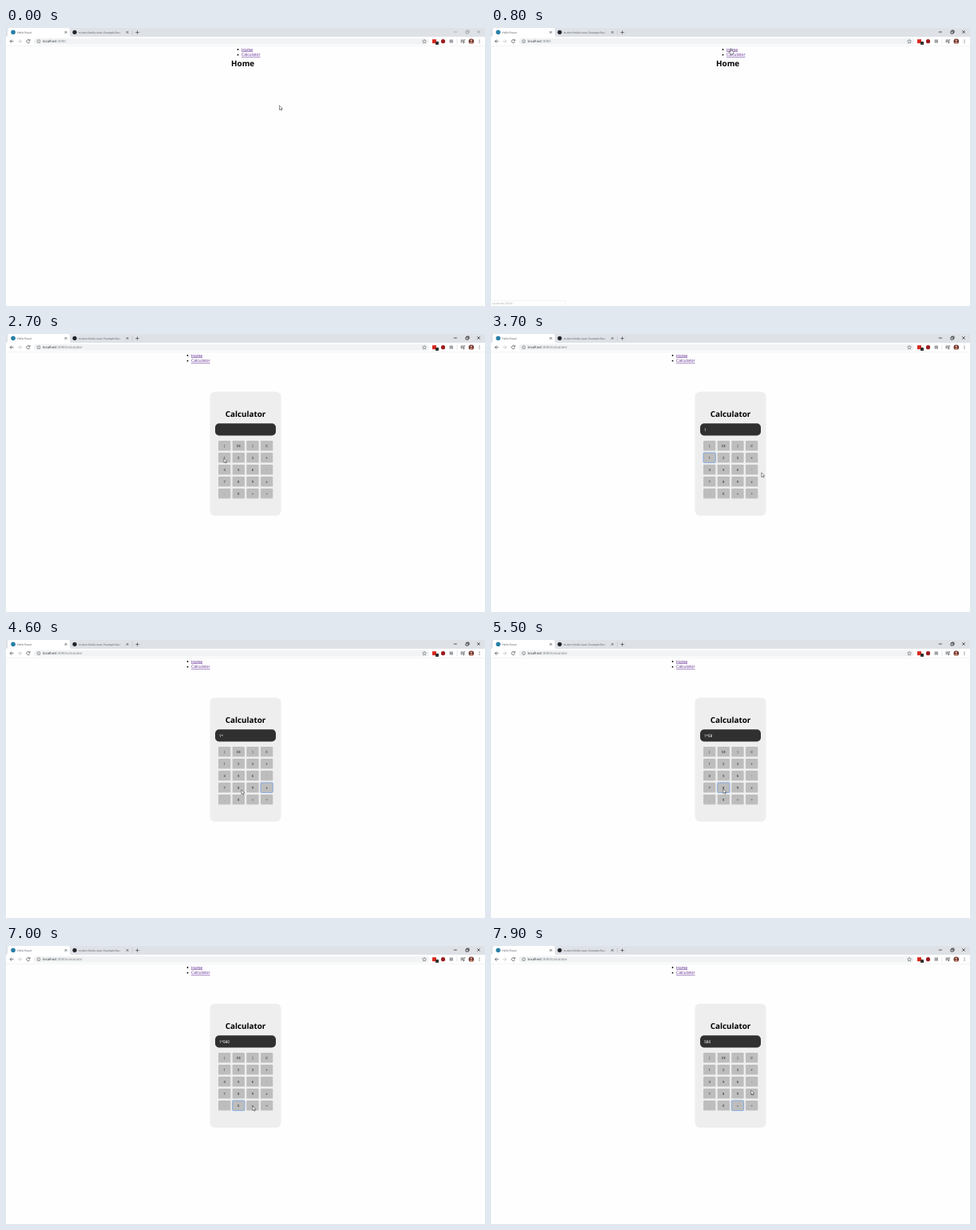
These frames come from a looping animation (600x349 px, 8000 ms). An HTML page:

```html
<!DOCTYPE html>
<html lang="en">
<head>
<meta charset="utf-8">
<title>Hello React</title>
<style>
  html, body { margin: 0; width: 100%; height: 100%; overflow: hidden; background: #fefefe; }
  svg { display: block; width: 600px; height: 349px; }
  text { font-family: "Open Sans", "Noto Sans", sans-serif; text-rendering: geometricPrecision; white-space: pre; }
  .small { font-size: 3.5px; fill: #50545a; }
  .url { font-size: 4.25px; fill: #25282c; }
  .link { font-size: 5px; fill: #551a8b; text-decoration: underline; }
  .title { font-size: 9.85px; font-weight: 700; }
  .key { font: 4.2px Roboto, "Liberation Sans", sans-serif; fill: #222; text-anchor: middle; }
  .line { fill: none; stroke: #4c5055; stroke-width: .75; }
</style>
</head>
<body>
<svg viewBox="0 0 600 349">
  <defs>
    <linearGradient id="fade">
      <stop offset="0" stop-color="#dee1e6" stop-opacity="0"/>
      <stop offset="1" stop-color="#dee1e6"/>
    </linearGradient>
  </defs>

  <!-- tab strip -->
  <rect width="600" height="11" fill="#dee1e6"/>
  <path d="M0 11Q2 11 2 9V2Q2 0 4 0H78Q80 0 80 2V9Q80 11 82 11Z" fill="#fff"/>
  <circle cx="9" cy="5.3" r="2.8" fill="#287fa5"/>
  <text class="small" x="14" y="6.9">Hello React</text>
  <circle cx="86" cy="5.3" r="2.6" fill="#202327"/>
  <text class="small" x="91" y="6.9" style="font-size:3.35px">m-dorn/hello-react: Example Reac</text>
  <rect x="139" y="1" width="9" height="9" fill="url(#fade)"/>
  <path class="line" d="M73.5 4l2.8 2.8m0-2.8l-2.8 2.8M150.6 4l2.8 2.8m0-2.8l-2.8 2.8M162.3 5.5h4.4m-2.2-2.2v4.4"/>
  <path d="M158.3 2.5v6" stroke="#a4a8ad" stroke-width=".4"/>
  <path id="controls" class="line" d="M560.8 5h4M576 4h3v3h-3zM577 4v-1h3v3h-1M590.3 3.2l3.4 3.4m0-3.4l-3.4 3.4"/>

  <!-- toolbar -->
  <rect y="11" width="600" height="11.5" fill="#fff"/>
  <path d="M0 22.6H600" stroke="#dfe1e4" stroke-width=".4"/>
  <rect x="35" y="12.8" width="495" height="8" rx="4" fill="#f1f3f4"/>
  <path class="line" d="M9.5 16.7H5m2.2-2.2L5 16.7l2.2 2.2"/>
  <path class="line" style="stroke:#c0c2c5" d="M14.8 16.7h4.5m-2.2-2.2l2.2 2.2l-2.2 2.2"/>
  <path class="line" d="M29.6 15.4a2.1 2.1 0 1 0 .3 2M30 14.2v1.8h-1.8"/>
  <circle class="line" cx="41" cy="16.7" r="2" style="stroke-width:.5"/>
  <path class="line" style="stroke-width:.5" d="M41 16.4v1.4M41 15.4v.5"/>
  <text class="url" x="46" y="18.3">localhost<tspan id="path" fill="#70757a"></tspan></text>
  <path class="line" style="stroke-width:.5" d="M524 14.3l.7 1.6l1.8.2l-1.4 1.2l.4 1.8l-1.5-1l-1.5 1l.4-1.8l-1.4-1.2l1.8-.2z"/>
  <rect x="534" y="14.2" width="5" height="5" fill="#d8281e"/>
  <rect x="538" y="17" width="4" height="4" rx=".6" fill="#333"/>
  <circle cx="547.5" cy="16.7" r="2.6" fill="#9c1d22"/>
  <rect x="555.5" y="14.5" width="4.5" height="4.2" fill="#a0a4a9"/>
  <path d="M565 13.5v6.5" stroke="#ccc" stroke-width=".5"/>
  <path class="line" d="M569.5 15h3.5m-3.5 1.5h3.5m-3.5 1.5h2M573.8 18.5V14.8h1.5"/>
  <circle cx="573.2" cy="18.4" r=".8" fill="#4c5055"/>
  <circle cx="582.8" cy="16.7" r="3.3" fill="#6e352e"/>
  <circle cx="582.8" cy="15.8" r="1.3" fill="#d2a08e"/>
  <path d="M580.4 19q2.4-3 4.8 0q-2.4 2-4.8 0" fill="#d2a08e"/>
  <path d="M593 14.6v.9m0 .8v.9m0 .8v.9" stroke="#4c5055" stroke-width=".9"/>

  <!-- page -->
  <g id="nav">
    <circle cx="-4.5" cy="27" r=".9"/>
    <circle cx="-4.5" cy="33.7" r=".9"/>
    <text class="link" y="28.5">Home</text>
    <text class="link" y="35.3">Calculator</text>
  </g>
  <text id="home" class="title" x="282" y="47.8">Home</text>
  <g id="calc">
    <rect x="255.5" y="72.5" width="89" height="155.5" rx="6" fill="#eee"/>
    <text class="title" x="300" y="104.2" text-anchor="middle">Calculator</text>
    <rect x="262" y="112.2" width="76" height="15.3" rx="5" fill="#303030"/>
    <text id="display" class="url" x="267" y="122.2" style="font:4.9px Roboto,sans-serif;fill:#fff"></text>
    <g id="keys"></g>
  </g>

  <g id="status">
    <path id="bubble" fill="#fff" stroke="#cdcfd2" stroke-width=".5"/>
    <text id="address" class="small" x="1.5" y="347.2" style="font-size:3.6px"></text>
  </g>

  <path id="arrow" d="M0 0V5.6L1.3 4.4L2.2 6.3L3 5.9L2.2 4.1H4Z" fill="#fff" stroke="#222" stroke-width=".5"/>
  <path id="hand" d="M-.6 .5Q0-.3 .6 .5V3L2.7 3.5Q3.3 3.7 3.2 4.5L2.6 7.4H-.6L-2.3 4.8Q-2.2 3.9-1.4 4.3L-.6 5Z" fill="#fff" stroke="#222" stroke-width=".5"/>
</svg>
<script>
const LOOP = 8000, STEP = 100;
const $ = id => document.getElementById(id);
const show = (id, on) => $(id).style.display = on ? '' : 'none';

const labels = ['(', 'CE', ')', 'C', ...'123+456-789x.0=÷'];
$('keys').innerHTML = labels.map((label, i) => {
  const x = 266 + i % 4 * 17.65, y = 134 + Math.floor(i / 4) * 15;
  return `<rect x="${x}" y="${y}" width="15.3" height="12.6" rx="1.2" fill="#bdbdbd"/>
    <text class="key" x="${x + 7.65}" y="${y + 7.8}">${label}</text>`;
}).join('');
const keyRects = [...$('keys').querySelectorAll('rect')];

// pointer stops: time, x, y
const stops = [
  [0, 342.5, 97.3], [100, 342.5, 97.3], [700, 300.5, 25.5], [1000, 300.5, 25.5],
  [1200, 306.8, 34.3], [1900, 306.8, 34.3], [2700, 273, 156], [3200, 273, 156],
  [3700, 338.8, 174], [4100, 326, 186], [4300, 326, 186], [4600, 295, 188],
  [4800, 291, 172], [5000, 291, 172], [5200, 291, 187], [5500, 291, 187],
  [5800, 291, 201], [6000, 291, 201], [6200, 317.3, 203.5], [6500, 318, 208],
  [6900, 309, 201], [7400, 309, 201], [7800, 325.8, 181], [8000, 325.8, 181]
];

// key presses: time, focused key, display
const presses = [
  [0, '', ''], [3000, '1', '1'], [4200, 'x', '1*'], [4900, '5', '1*5'],
  [5400, '8', '1*58'], [5900, '0', '1*580'], [7200, '=', '580']
];

function pointer(t) {
  const i = stops.findIndex(s => s[0] > t);
  const [t0, x0, y0] = stops[i - 1], [t1, x1, y1] = stops[i];
  const u = (t - t0) / (t1 - t0), e = u * u * (3 - 2 * u);
  return [x0 + (x1 - x0) * e, y0 + (y1 - y0) * e];
}

function draw(t) {
  const calculator = t >= 1300;
  show('home', !calculator);
  show('calc', calculator);
  $('nav').setAttribute('transform', `translate(${calculator ? 232 : 295} 0)`);
  $('path').textContent = calculator ? ':3000/calculator' : ':3000';
  $('controls').style.stroke = t < 100 ? '#999da2' : '#222';

  const [, focus, value] = presses.filter(p => p[0] <= t).pop();
  $('display').textContent = value;
  keyRects.forEach((rect, i) => {
    rect.setAttribute('stroke', labels[i] === focus ? '#7da5e0' : 'none');
    rect.setAttribute('stroke-width', .9);
  });

  const overCalculator = t >= 1100, wide = t >= 1400;
  $('status').style.opacity = t < 700 || t >= 2200 ? 0
    : t < 1000 ? (t - 600) / 400 : Math.min(1, (2200 - t) / 200);
  $('address').textContent = 'localhost:3000' + (overCalculator ? '/calculator' : '/');
  $('bubble').setAttribute('d', `M-1 342.3H${wide ? 198 : 92}q1.5 0 1.5 1.5V350H-1Z`);

  const hand = t >= 700 && t < 2000;
  show('hand', hand);
  show('arrow', !hand);
  $(hand ? 'hand' : 'arrow').setAttribute('transform', `translate(${pointer(t)})`);
}

function tick() {
  draw(Math.floor(performance.now() % LOOP / STEP) * STEP);
  requestAnimationFrame(tick);
}
tick();
</script>
</body>
</html>
```
